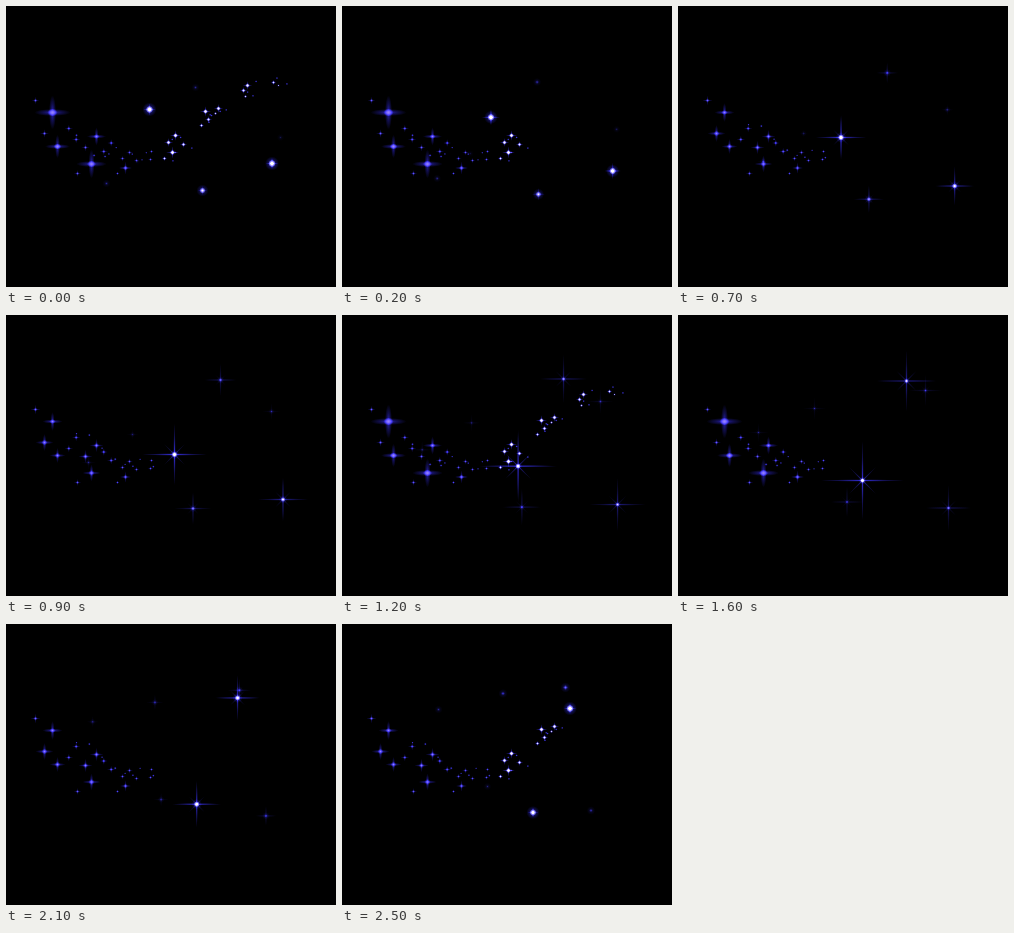
An HTML page with a canvas that plays this animation: 330x281 px, repeating every 2.6 s.

```html
<!DOCTYPE html>
<html lang="en">
<head>
<meta charset="utf-8">
<title>Night sparkles</title>
<style>
html, body { margin: 0; width: 100%; height: 100%; overflow: hidden; background: #000; }
canvas { display: block; width: 330px; height: 281px; }
</style>
</head>
<body>
<canvas id="sky" width="330" height="281"></canvas>
<script>
const ctx = document.getElementById('sky').getContext('2d');
const LOOP = 2600, STEP = 100, LAST = 25;

// Key points of the still stars; sizes follow from their order
const large = [[46, 106], [85, 157.5], [51, 140], [90, 130], [119, 161.5]];
const small = [
  [38, 127], [79, 141], [29, 94], [71, 167], [123, 146],
  [116, 152], [130, 154], [144, 153], [145, 145], [111, 167]
];
const restless = [[66, 122], [66, 133], [101, 145], [101, 136.5]];
const trail = [
  [166, 146], [169, 129], [162, 136], [177, 138], [158, 152],
  [199, 105], [212, 102], [202, 113], [195, 119], [209, 107],
  [241, 79], [237, 84], [267, 76], [239, 90], [272, 79]
];

// Drifting stars: four path points, then first and last brightness
const KNOTS = [0, 9, 16, LAST];
const drifters = [
  { path: [[143, 103], [168, 139], [184, 165], [190.5, 188]], glow: [.95, .85] },
  { path: [[196, 184], [186.5, 193], [168.5, 186.5], [145, 162]], glow: [.72, .18] },
  { path: [[265.5, 157], [276.5, 184], [270, 192.5], [248.5, 186]], glow: [.95, .28] },
  { path: [[189, 81], [214, 64.5], [228, 65.5], [227.5, 84]], glow: [.22, .95] },
  { path: [[274, 131], [265, 96], [247, 75], [223, 63]], glow: [.12, .48] },
  { path: [[131, 155], [126, 119], [136, 93], [160.5, 69]], glow: [.08, .34] },
  { path: [[100, 177], [82, 147], [80, 117], [96, 85]], glow: [.22, .22] }
];

const clamp = v => Math.max(0, Math.min(1, v));

function seeded(seed) {
  return () => (seed = seed * 16807 % 2147483647) / 2147483647;
}

// Cubic through the four path points
function along(path, t, axis) {
  return path.reduce((sum, p, i) => sum + KNOTS.reduce(
    (w, k, j) => j === i ? w : w * (t - k) / (KNOTS[i] - k), p[axis]), 0);
}

function blob(x, y, rx, ry, rgb, alpha, turn = 0, hold = 0) {
  ctx.save();
  ctx.translate(x + .5, y + .5);
  ctx.rotate(turn);
  ctx.scale(rx, ry);
  const g = ctx.createRadialGradient(0, 0, 0, 0, 0, 1);
  g.addColorStop(0, `rgba(${rgb},${alpha})`);
  g.addColorStop(hold, `rgba(${rgb},${alpha})`);
  g.addColorStop(.5 + hold / 2, `rgba(${rgb},${alpha * .42})`);
  g.addColorStop(1, `rgba(${rgb},0)`);
  ctx.fillStyle = g;
  ctx.beginPath();
  ctx.arc(0, 0, 1, 0, 7);
  ctx.fill();
  ctx.restore();
}

function cross(x, y, r, w, rgb, alpha) {
  blob(x, y, r, w, rgb, alpha);
  blob(x, y, w, r * .95, rgb, alpha);
}

function twinkle(x, y, r) {
  const a = clamp(.3 + r * .1), core = .9 + r * .24;
  cross(x, y, r, Math.max(1.1, r * .2), '46,38,210', a * .85);
  blob(x, y, core, core * (r > 9 ? .75 : 1), '85,76,245', a * .85, 0, r > 11 ? .35 : 0);
}

function spark(x, y, r) {
  const a = clamp(.2 + r * .16), core = .7 + r * .26;
  cross(x, y, r, 1.2, '65,56,245', a);
  blob(x, y, core + .7, core + .7, '64,55,245', a * .7);
  blob(x, y, core, core, '255,255,255', a, 0, .15);
}

function band(odd) {
  const side = odd ? 1 : -1, rnd = seeded(odd ? 77 : 41);
  large.forEach(([x, y], i) => twinkle(x, y, odd ? 10 - i : 18 - 2.8 * i));
  small.forEach(([x, y], i) => {
    const r = 4.5 - .25 * i;
    twinkle(x, y, odd ? Math.max(9 - 2 * i, r) : r);
  });
  restless.forEach(([x, y], i) => twinkle(x + (i % 2 ? -side : side) * 3.7, y, 4.3));
  // Dust gathers toward the narrow end
  for (let i = 0; i < 8; i++) {
    const u = (i + rnd()) / 8;
    twinkle(70 + 78 * u, 133 + 20 * u + (rnd() - .5) * (40 - 30 * u), 1 + rnd());
  }
}

// The trail grows toward each peak and withdraws after it
function drawTrail(n) {
  const lit = Math.max(...[0, 12, 26].map(peak => 3 - Math.abs(n - peak)));
  const rnd = seeded(19);
  trail.slice(0, Math.max(0, lit) * 5).forEach(([x, y], i) => {
    const group = Math.floor(i / 5);
    spark(x, y, 6.5 - .9 * (i % 5) - .9 * group);
    twinkle(x + 3 + rnd() * 6, y + (rnd() - .5) * 9, 1.5);
  });
}

function drift({ path, glow }, n) {
  const x = along(path, n, 0), y = along(path, n, 1), u = n / LAST;
  const b = glow[0] + (glow[1] - glow[0]) * u;
  const flare = .14 + .86 * Math.sin(Math.PI * u ** 1.3) ** 1.2;
  const halo = (3 + 4 * b) * (1.1 - .5 * flare);
  const core = (1.2 + 2.4 * b) * (1.1 - .35 * flare);
  const arm = 48 * b * flare, ray = 22 * b * flare;
  blob(x, y, halo, halo, '44,38,215', b * (1.05 - .35 * flare));
  cross(x, y, arm, 1.25, '58,50,250', clamp(b * (.35 + .7 * b)));
  for (const turn of [Math.PI / 4, -Math.PI / 4]) {
    blob(x, y, ray, 1, '60,53,245', b * b * flare * .7, turn);
  }
  blob(x, y, core, core, '90,82,255', b * .9);
  blob(x, y, core, core, '255,255,255', clamp((b - .45) * 2.2), 0, .1);
}

function draw(n) {
  ctx.globalCompositeOperation = 'source-over';
  ctx.fillStyle = '#000';
  ctx.fillRect(0, 0, 330, 281);
  ctx.globalCompositeOperation = 'lighter';
  band(n % 2 === 1);
  drawTrail(n);
  drifters.forEach(star => drift(star, n));
}

const start = performance.now();
function tick() {
  draw(Math.floor((performance.now() - start) % LOOP / STEP));
  requestAnimationFrame(tick);
}
tick();
</script>
</body>
</html>
```
